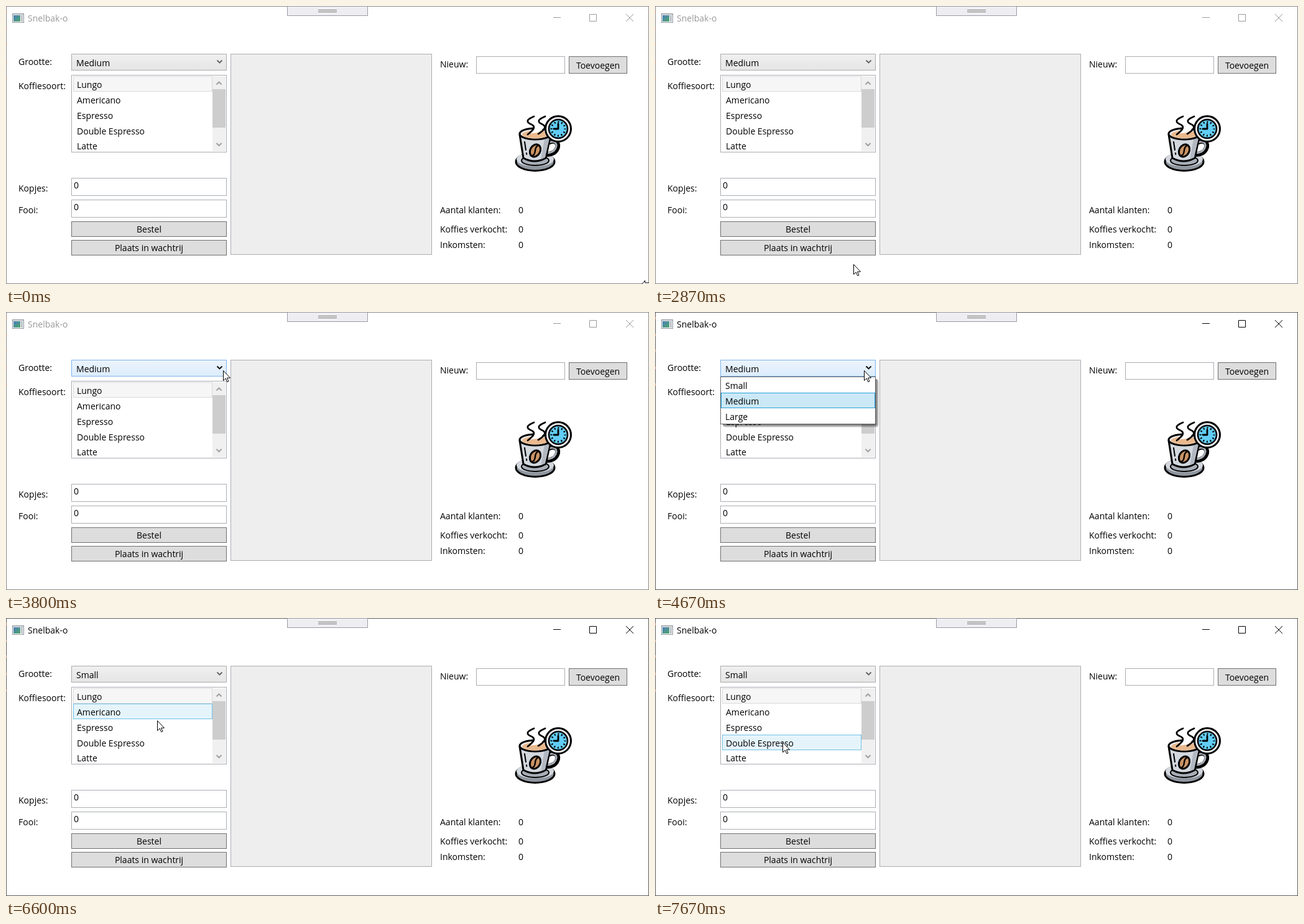
Recreate the animation shown at these times as an HTML page. Size 1034x448 px, loop 8000 ms.

```html
<!DOCTYPE html>
<html lang="nl">
<head>
<meta charset="utf-8">
<title>Koffiebestelling</title>
<style>
html, body { margin: 0; width: 100%; height: 100%; overflow: hidden; background: #fff; }
svg { display: block; }
text { font: 14px "Open Sans", "Noto Sans", sans-serif; font-variant-ligatures: none; white-space: pre; }
.mid { text-anchor: middle; }
.ink { fill: none; stroke: #000; stroke-width: 3; stroke-linecap: round; stroke-linejoin: round; }
</style>
</head>
<body>
<svg id="stage" width="1034" height="448" viewBox="0 0 1034 448">
  <defs>
    <linearGradient id="rest" x2="0" y2="1"><stop stop-color="#f0f0f0"/><stop offset="1" stop-color="#e5e5e5"/></linearGradient>
    <linearGradient id="over" x2="0" y2="1"><stop stop-color="#ecf4fc"/><stop offset="1" stop-color="#dcecfc"/></linearGradient>
    <linearGradient id="down" x2="0" y2="1"><stop stop-color="#daecfc"/><stop offset="1" stop-color="#c4e0fc"/></linearGradient>
    <linearGradient id="pane" x2="1" y2="1"><stop stop-color="#4a7fc0"/><stop offset="1" stop-color="#4fa565"/></linearGradient>
    <clipPath id="listClip"><rect x="106" y="112" width="248" height="122"/></clipPath>
    <clipPath id="popClip"><rect x="105" y="104" width="270" height="100"/></clipPath>
  </defs>
  <g id="form"></g>
  <g id="cup">
    <ellipse cx="851" cy="251" rx="31" ry="14.5" fill="#8f969f" stroke="#000" stroke-width="3"/>
    <ellipse cx="851" cy="247" rx="30" ry="11.5" fill="#d3d7de"/>
    <ellipse cx="851" cy="249" rx="22" ry="8" fill="#a8aeb7" stroke="#000" stroke-width="2"/>
    <path class="ink" d="M872 220C884 214 890 222 886 230C883 237 877 239 869 239" style="stroke-width:8"/>
    <path class="ink" d="M873 220C883 216 887 222 884 229C881 235 876 237 869 237" style="stroke:#a8aeb7"/>
    <path class="ink" d="M826 207L832 245Q850 255 868 245L876 207Z" style="fill:#d3d7de"/>
    <path d="M866 214L874.500 211L867 244L860 247Z" fill="#b2b8c1"/>
    <ellipse cx="851" cy="206" rx="25" ry="9" fill="#f0f1f3" stroke="#000" stroke-width="3"/>
    <ellipse cx="851" cy="207" rx="21" ry="6.500" fill="#e9b98e"/>
    <path class="ink" d="M834 219l2 13M837 237l.3 2" style="stroke-width:2"/>
    <g transform="translate(851 233) rotate(28)">
      <ellipse rx="8" ry="10.500" fill="#cc9363" stroke="#000" stroke-width="3"/>
      <path class="ink" d="M0-9C-5-3 5 3 0 9" style="stroke-width:2.500"/>
    </g>
    <path d="M849 178C840 183 837 186 844 190C853 195 847 200 839 206L856 204C864 198 870 194 861 189C854 185 858 182 866 177Z" fill="#fff"/>
    <path class="ink" d="M849 178C839 182 835 186 843 190C854 194 848 200 839 207M867 178C857 182 853 186 861 190C871 194 866 200 856 206" style="stroke-width:2.800"/>
    <circle cx="888" cy="198" r="20.500" fill="#eceef2" stroke="#000" stroke-width="3"/>
    <circle cx="888" cy="198" r="15" fill="#62cdf4" stroke="#000" stroke-width="2.500"/>
    <circle cx="888" cy="198" r="11" fill="none" stroke="#000" stroke-width="3" stroke-dasharray="2 3.760" stroke-dashoffset="1"/>
    <path class="ink" d="M888 190v8h-7" style="stroke-width:2.800"/>
  </g>
  <g clip-path="url(#popClip)"><g id="popup"></g></g>
  <path id="resize" d="M1022.500 448.500L1027.500 442.500V446H1036V449Z" fill="#fff" stroke="#000"/>
  <path id="arrow" d="M.5.5V16.500L4.200 13L6.800 18.700L9 17.700L6.500 12.200H11.500Z" fill="#fff" stroke="#000"/>
</svg>
<script>
const $ = id => document.getElementById(id);
const form = $("form"), popup = $("popup");

function add(parent, tag, attrs, content) {
  const node = document.createElementNS("http://www.w3.org/2000/svg", tag);
  set(node, attrs);
  if (content) node.textContent = content;
  parent.append(node);
  return node;
}
function set(node, attrs) {
  for (const k in attrs) node.setAttribute(k, attrs[k]);
}
const box = (p, x, y, w, h, fill, stroke) =>
  add(p, "rect", { x: x + .5, y: y + .5, width: w - 1, height: h - 1, fill, stroke });
const fillRect = (p, x, y, width, height, fill) => add(p, "rect", { x, y, width, height, fill });
const label = (p, x, y, s, cls = "") => add(p, "text", { x, y, class: cls }, s);
const line = (p, d, stroke, width = 1) =>
  add(p, "path", { d, fill: "none", stroke, "stroke-width": width });

// Window frame and title bar
const frame = box(form, 0, 0, 1034, 448, "#fff", "#8a8a8a");
[8, 35, 60, 88, 115].forEach(y => fillRect(form, 0, y, 1, 4, "#c08068"));
box(form, 10, 12, 19, 15, "#fff", "#8b9299");
fillRect(form, 11, 13, 17, 2, "#d5d9dd");
fillRect(form, 12, 15, 11, 10, "url(#pane)");
fillRect(form, 24, 15, 3, 10, "#b9c0c6");
const title = label(form, 35, 25, "Snelbak-o");
const controls = ["M880 18.500H892", "M938.500 13.500h11v11h-11Z", "M997 13L1009 25M1009 13L997 25"]
  .map(d => line(form, d, "#999"));
box(form, 452, 0, 130, 16, "#eeeef2", "#9a9ba6");
line(form, "M502 6.500H532M502 9.500H532", "#717171");

// Labels
[[20, 95, "Grootte:"], [20, 134, "Koffiesoort:"], [20, 299, "Kopjes:"], [20, 334, "Fooi:"],
 [698, 99, "Nieuw:"], [698, 334, "Aantal klanten:"], [698, 365, "Koffies verkocht:"],
 [698, 390, "Inkomsten:"], [824, 334, "0"], [824, 365, "0"], [824, 390, "0"]]
  .forEach(a => label(form, ...a));

// Controls
const combo = box(form, 105, 77, 250, 27, "url(#rest)", "#acacac");
const size = label(form, 113, 97, "Medium");
const chevron = line(form, "M339.500 87.500L343.500 91.500L347.500 87.500", "#606060", 1.8);

box(form, 105, 111, 250, 125, "#fff", "#abadb3");
const list = add(form, "g", { "clip-path": "url(#listClip)" });
const items = ["Lungo", "Americano", "Espresso", "Double Espresso", "Latte"].map((name, i) => {
  const y = 113 + 25 * i;
  const node = box(list, 108, y, 224, 25, i ? "none" : "#f6f6f6", i ? "none" : "#dadada");
  label(list, 114, y + (i === 4 ? 18 : 19), name);
  return node;
});
fillRect(list, 332, 113, 21, 121, "#f0f0f0");
const up = fillRect(list, 332, 113, 21, 21, "#f0f0f0");
const thumb = fillRect(list, 332, 134, 21, 62, "#cdcdcd");
line(list, "M338.500 126.500L342.500 122.500L346.500 126.500", "#a0a0a0", 2);
line(list, "M338.500 221L342.500 225L346.500 221", "#a0a0a0", 2);

const fields = [277, 312].map(y => {
  const node = box(form, 105, y, 250, 29, "#fff", "#abadb3");
  label(form, 109, y + 17, "0");
  return node;
});
const buttons = [[347, "Bestel"], [377, "Plaats in wachtrij"]].map(([y, s]) => {
  const node = box(form, 105, y, 250, 25, "#ddd", "#707070");
  label(form, 230, y + 18, s, "mid");
  return node;
});
box(form, 361, 77, 324, 324, "#eee", "#abadb3");
box(form, 756, 81, 143, 28, "#fff", "#abadb3");
box(form, 905, 81, 94, 28, "#ddd", "#707070");
label(form, 952, 101, "Toevoegen", "mid");

// Drop-down list
for (let i = 1; i < 6; i++)
  add(popup, "rect", { x: 109, y: 108, width: 246 + i, height: 73 + i, rx: i, fill: "#000", opacity: .13 });
box(popup, 105, 104, 250, 77, "#fff", "#646464");
const options = ["Small", "Medium", "Large"].map((s, i) => {
  const node = box(popup, 106, 105 + 25 * i, 248, 25, "none", "none");
  label(popup, 113, 124 + 25 * i, s);
  return node;
});

// Pointer path: tick, x, y (15 ticks per second)
const path = [
  [43, 319, 416], [44, 319, 386], [45, 320, 338], [46, 321, 272], [47, 323, 208], [48, 325, 160],
  [49, 326, 146], [50, 334, 131], [51, 345, 117], [52, 354, 105], [53, 356, 96], [54, 356, 96],
  [57, 349, 94], [69, 349, 94], [70, 336, 94], [72, 315, 101], [75, 298, 109], [93, 298, 109],
  [98, 248, 155], [99, 243, 165], [102, 222, 190], [105, 206, 204], [107, 206, 204],
  [110, 212, 204], [113, 212, 204], [115, 205, 200]
];
function pointer(n) {
  if (n < path[0][0]) return [-50, -50];
  const i = path.findIndex(k => k[0] > n);
  if (i < 0) return path[path.length - 1].slice(1);
  const a = path[i - 1], b = path[i], f = (n - a[0]) / (b[0] - a[0]);
  return [1, 2].map(j => Math.round(a[j] + (b[j] - a[j]) * f));
}

const PRESS = 63, RELEASE = 67, PICK = 81;

function draw(ms) {
  const n = Math.floor((ms + 3.4) * 15 / 1000);
  const [x, y] = pointer(n);
  // Hover feedback trails the pointer by one tick.
  const [hx, hy] = pointer(n - 1);
  const open = n > PRESS && n < PICK, active = n >= PRESS;
  const hit = (l, t, w, h) => hx >= l && hx < l + w && hy >= t && hy < t + h;

  $("resize").style.display = n < 2 ? "" : "none";
  set($("arrow"), { transform: `translate(${x} ${y})` });

  frame.setAttribute("stroke", active ? "#5c5c5c" : "#8a8a8a");
  title.setAttribute("fill", active ? "#000" : "#999");
  controls.forEach(c => c.setAttribute("stroke", active ? "#000" : "#999"));

  const over = hit(105, 77, 250, 27), held = n >= PRESS && n < RELEASE;
  set(combo, {
    fill: `url(#${held ? "down" : over ? "over" : "rest"})`,
    stroke: held ? "#569de5" : over ? "#7eb4ea" : "#acacac"
  });
  chevron.setAttribute("stroke", over ? "#000" : "#606060");
  size.textContent = n < PICK ? "Medium" : "Small";

  items.forEach((node, i) => {
    if (!i) return;
    const on = !open && hy < 234 && hit(108, 113 + 25 * i, 224, 25);
    set(node, { fill: on ? "#e5f4fb" : "none", stroke: on ? "#70c0e7" : "none" });
  });
  up.setAttribute("fill", !open && hit(332, 113, 21, 21) ? "#dadada" : "#f0f0f0");
  thumb.setAttribute("fill", !open && hit(332, 134, 21, 62) ? "#a6a6a6" : "#cdcdcd");
  fields.forEach((node, i) =>
    node.setAttribute("stroke", hit(105, 277 + 35 * i, 250, 29) ? "#7eb4ea" : "#abadb3"));
  buttons.forEach((node, i) => {
    const on = hit(105, 347 + 30 * i, 250, 25);
    set(node, { fill: on ? "#bee6fd" : "#ddd", stroke: on ? "#3c7fb1" : "#707070" });
  });

  popup.style.display = open ? "" : "none";
  const slide = Math.min(1, (n - PRESS) / 3);
  set(popup, { transform: `translate(0 ${Math.round((slide - 1) * 82)})` });
  const small = hit(106, 104, 248, 26);
  set(options[0], { fill: small ? "#b7dff3" : "none", stroke: small ? "#26a0da" : "none" });
  set(options[1], { fill: small ? "#f6f6f6" : "#cbe8f6", stroke: small ? "#dadada" : "#26a0da" });
}

const start = performance.now();
function tick() {
  draw((performance.now() - start) % 8000);
  requestAnimationFrame(tick);
}
tick();
</script>
</body>
</html>
```
